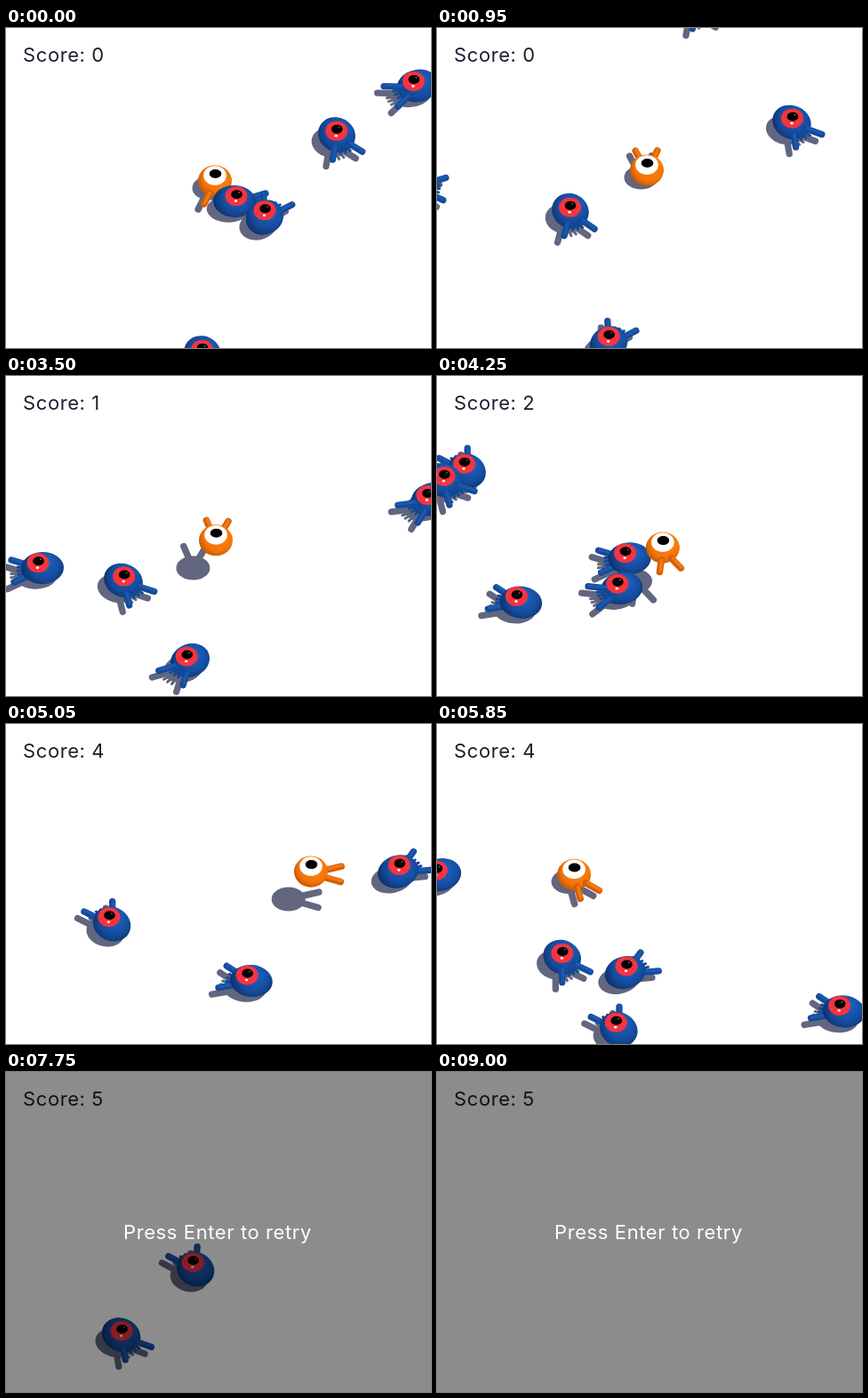
An HTML page with a canvas that plays this animation: 478x360 px, repeating every 9.2 s.

```html
<!DOCTYPE html>
<html lang="en">
<head>
<meta charset="utf-8">
<title>Creature hop</title>
<style>
html, body { margin: 0; width: 100%; height: 100%; overflow: hidden; background: #fff; }
canvas { display: block; }
</style>
</head>
<body>
<canvas id="stage" width="478" height="360"></canvas>
<script>
const ctx = document.getElementById('stage').getContext('2d');
const W = 478, H = 360, LOOP = 9200, STEP = 50, DEATH = 7700;
const TILT = Math.SQRT1_2;      // camera pitch of 45 degrees
const RAD = Math.PI / 180;
const IMPULSE = 19.4, GRAVITY = 75, LIFT = 13.4;
const HOP = 2000 * IMPULSE / GRAVITY;
const SPEED = 235, REACH = 55;

const mobLook = {
  a: 24, b: 20.5, c: 15, spread: 28, reach: 38, arm: 7.3, armDrop: 1.5, shade: 9,
  light: '#1c60bd', base: '#154c9e', dark: '#0b2f69', limb: '#154a98', limbLight: '#1b59b0',
  eye: '#f5343f', eyeRx: 12.5, eyeRy: 11, pupilRx: 6.3
};
const heroLook = {
  a: 19, b: 19, c: 16, spread: 20, reach: 36, arm: 7.5, armDrop: 2, shade: 8,
  light: '#ff8612', base: '#f37308', dark: '#a04608', limb: '#d26007', limbLight: '#f5780e',
  eye: '#ffffff', eyeRx: 12.8, eyeRy: 10.8, pupilRx: 6.8
};

// Each mob crosses in a straight line: x, y and arm direction at the wave's time, speed.
const mob = (at, x, y, arms, speed = SPEED) => ({ at, x, y, arms, speed, dead: Infinity });
const wave = (at, ...list) => list.map(m => mob(at, ...m));
const mobs = [
  wave(0, [372, 120, 69], [463, 65, 154], [257, 195, 5, 298], [291, 213, -64], [221, 366, 72.6, 250]),
  wave(950, [399, 106, 55]),
  wave(2400, [359, 58, -70], [185, 185, -18], [296, 243, 141, 213]),
  wave(3500, [41, 216, 175], [132, 230, 52, 270], [207, 320, 130, 300]),
  wave(4420, [262, 225, 160, 340]),
  wave(5050, [119, 225, 243], [276, 289, 195], [441, 166, -35, 350]),
  wave(6700, [80, 20, 245, 300], [177, 99, 150], [33, 119, 62, 270]),
  wave(8600, [15, 180, 55])
].flat();

// time, x, y where the hero turns
const turns = [
  [0, 235, 172], [350, 235, 110], [950, 236, 160], [1200, 236, 178], [2000, 276, 118],
  [2400, 214, 166], [2550, 190, 184], [2950, 242, 125], [3500, 236, 208], [3900, 262, 245],
  [4420, 250, 212], [4900, 385, 190], [5050, 343, 189], [5700, 171, 189], [6420, 90, 95],
  [7050, 256, 95], [7690, 250, 215]
];

// Runs of hops: each bounce squashes what is below.
const runs = [
  { start: 1912, bounces: 0 },
  { start: 2868, bounces: 4 },
  { start: 6249, bounces: 1 }
];

function heightAt(t) {
  const run = runs.find(r => t >= r.start && t < r.start + HOP * (r.bounces + 1));
  if (!run) return 0;
  const s = (t - run.start) % HOP / 1000;
  return (IMPULSE * s - GRAVITY / 2 * s * s) * LIFT;
}

function heroAt(t) {
  const i = Math.max(1, turns.findIndex(p => t <= p[0]));
  const [t0, x0, y0] = turns[i - 1], [t1, x1, y1] = turns[i];
  const p = (t - t0) / (t1 - t0);
  return {
    x: x0 + (x1 - x0) * p,
    y: y0 + (y1 - y0) * p,
    arms: Math.atan2((y0 - y1) / TILT, x0 - x1) / RAD,
    h: heightAt(t), look: heroLook
  };
}

function mobAt(m, t) {
  const d = m.speed * (t - m.at) / 1000;
  return {
    x: m.x - Math.cos(m.arms * RAD) * d,
    y: m.y - Math.sin(m.arms * RAD) * d * TILT,
    arms: m.arms, h: 0, look: mobLook
  };
}

for (const run of runs) {
  for (let k = 1; k <= run.bounces; k++) {
    const t = run.start + k * HOP, hero = heroAt(t);
    for (const m of mobs) {
      const p = mobAt(m, t);
      if (Math.hypot(p.x - hero.x, p.y - hero.y) < REACH) m.dead = Math.min(m.dead, t);
    }
  }
}

function oval(x, y, rx, ry, fill, turn = 0) {
  ctx.fillStyle = fill;
  ctx.beginPath();
  ctx.ellipse(x, y, rx, ry, turn, 0, 7);
  ctx.fill();
}

// Outline of an ellipsoid turned on the ground and seen by the tilted camera.
function ellipsoid(x, y, deg, a, b, c, fill) {
  const C = Math.cos(deg * RAD), S = Math.sin(deg * RAD);
  const xx = a * a * C * C + b * b * S * S;
  const xy = TILT * (a * a - b * b) * C * S;
  const yy = (a * a * S * S + b * b * C * C + c * c) / 2;
  const mid = (xx + yy) / 2, dev = Math.hypot((xx - yy) / 2, xy);
  oval(x, y, Math.sqrt(mid + dev), Math.sqrt(mid - dev), fill, Math.atan2(2 * xy, xx - yy) / 2);
}

function limb(x, y, deg, from, to, width, color) {
  const C = Math.cos(deg * RAD), S = Math.sin(deg * RAD) * TILT;
  ctx.strokeStyle = color;
  ctx.lineWidth = width;
  ctx.beginPath();
  ctx.moveTo(x + C * from, y + S * from);
  ctx.lineTo(x + C * to, y + S * to);
  ctx.stroke();
}

function limbs(c, x, y, color, glint) {
  const k = c.look;
  if (k === mobLook) {
    for (const d of [-12, 0, 12]) limb(x, y, c.arms + d, 18, 28, 3, color);
  }
  for (const side of [-1, 1]) {
    const deg = c.arms + side * k.spread;
    limb(x, y, deg, 17, k.reach, k.arm, color);
    if (glint) limb(x + 0.8, y - 1.2, deg, 19, k.reach, k.arm - 4, glint);
  }
}

function shadow(c) {
  const s = c.look.shade + c.h, color = '#62667f';
  const x = c.x - s * 0.82, y = c.y - c.h + s;
  ellipsoid(x, y, c.arms, c.look.a, c.look.b, 3, color);
  limbs(c, x, y, color);
}

function creature(c) {
  const k = c.look, isMob = k === mobLook, x = c.x, y = c.y - c.h;
  const C = Math.cos(c.arms * RAD), S = Math.sin(c.arms * RAD);
  const drawLimbs = () => limbs(c, x, y + k.armDrop, k.limb, k.limbLight);
  const front = S > 0.3;
  if (!front) drawLimbs();

  const g = ctx.createRadialGradient(x + 5, y - 7, 3, x + 2, y - 3, 26);
  g.addColorStop(0, k.light);
  g.addColorStop(0.6, k.base);
  g.addColorStop(1, k.dark);
  ellipsoid(x, y, c.arms, k.a, k.b, k.c, g);
  if (front) drawLimbs();

  const ex = x + (isMob ? 3.5 * C - 1.5 : 0);
  const ey = y - 6 + (isMob ? 2 * S : 0);
  oval(ex, ey, k.eyeRx, k.eyeRy, k.eye);
  oval(ex + 0.5, ey - 2, k.pupilRx, 5, '#000');
  if (isMob) {
    oval(ex + 3, ey - 4, 1, 0.8, '#777');
    oval(ex - 0.5, ey + 5.5, 1.7, 1.3, '#fff');
  }
}

function label(text, x, y, color) {
  ctx.font = '400 22px Inter, "Open Sans", sans-serif';
  ctx.letterSpacing = '0.6px';
  ctx.fillStyle = color;
  ctx.fillText(text, x, y);
}

function draw(t) {
  ctx.fillStyle = '#fff';
  ctx.fillRect(0, 0, W, H);
  ctx.lineCap = 'round';

  const cast = mobs.filter(m => t < m.dead).map(m => mobAt(m, t));
  if (t < DEATH) cast.push(heroAt(Math.min(t, turns.at(-1)[0])));
  cast.sort((p, q) => p.y + p.h - q.y - q.h);
  cast.forEach(shadow);
  cast.forEach(creature);

  label('Score: ' + mobs.filter(m => t >= m.dead).length, 19, 38, '#201d2f');
  if (t >= DEATH) {
    ctx.fillStyle = 'rgba(0, 0, 0, 0.45)';
    ctx.fillRect(0, 0, W, H);
    label('Press Enter to retry', 132, 188, '#fff');
  }
}

const begin = performance.now();
function tick() {
  const t = (performance.now() - begin) % LOOP;
  draw(Math.floor(t / STEP) * STEP);
  requestAnimationFrame(tick);
}
tick();
</script>
</body>
</html>
```
